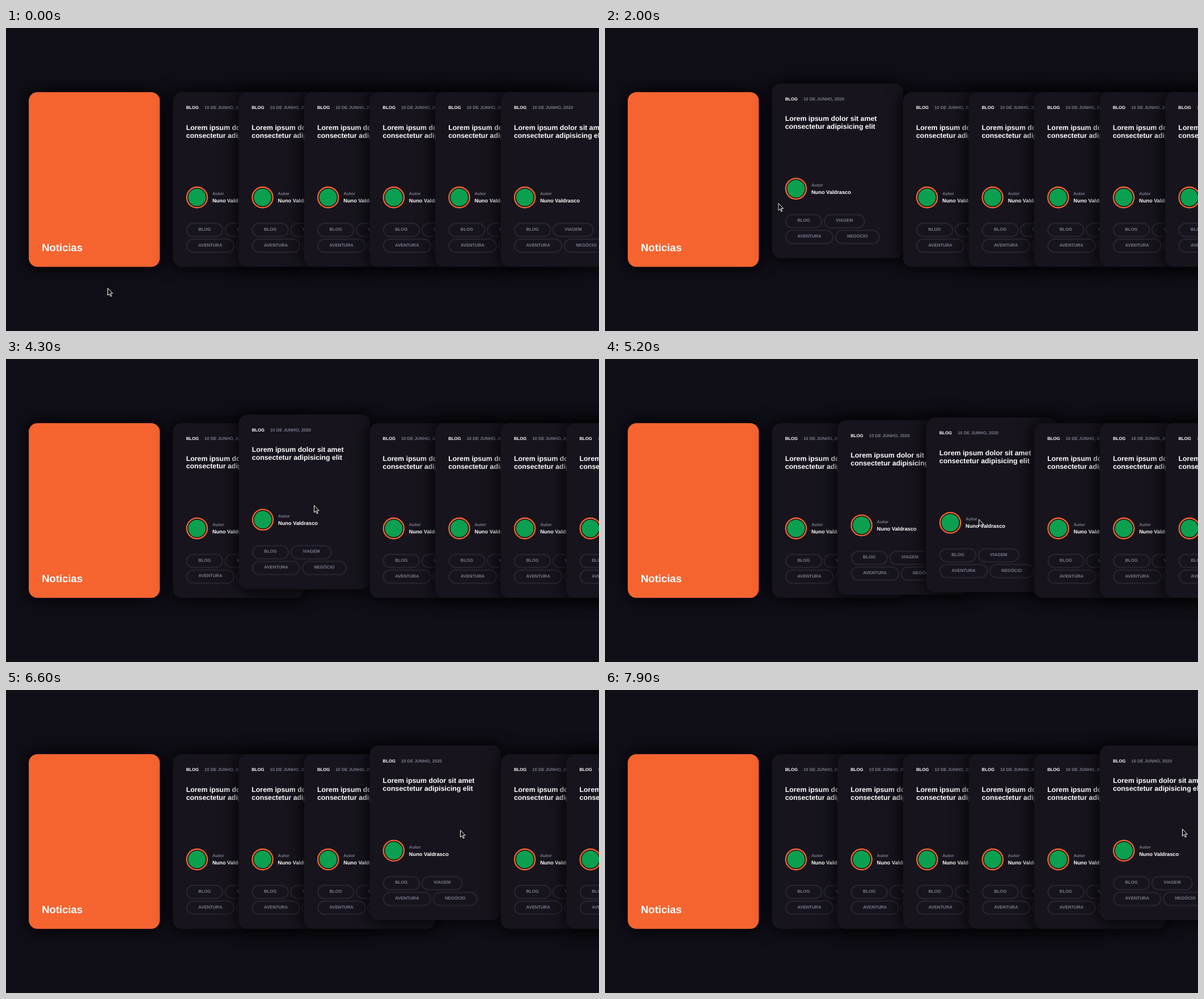
An HTML page that plays this animation: 1046x535 px, repeating every 8 s.

```html
<!DOCTYPE html>
<html lang="pt">
<head>
<meta charset="utf-8">
<style>
  html, body { margin: 0; width: 100%; height: 100%; overflow: hidden; background: #100e17; }
  #stage { position: relative; width: 100%; height: 100%; overflow: clip; contain: strict; }
  #deck {
    position: absolute; width: 100%; height: 100%;
    transform: scale(.771); transform-origin: 0 0;
    font: bold 10px/12px "Liberation Sans", Arial, sans-serif;
    text-rendering: geometricPrecision; white-space: nowrap; color: #7a7a8c;
  }
  .card {
    position: absolute; left: 52px; top: 147px; width: 300px; height: 400px;
    border-radius: 20px; background: #17141d; box-shadow: 0 0 40px #000;
  }
  .card > * { position: absolute; left: 30px; }
  .title { background: #f66430; }
  .title b { top: 342.7px; font-size: 24px; line-height: 27px; color: #fff; }
  .head { top: 30.7px; }
  .head b { margin-right: 13px; color: #fff; }
  .text { top: 72.7px; font-size: 16px; line-height: 18px; color: #fff; }
  .avatar {
    top: 216px; width: 40px; height: 40px; padding: 2px; border: 3px solid #f66430;
    border-radius: 50%; background: #0aa04f content-box;
  }
  .card > .author { left: 90px; top: 227.7px; }
  .author b { display: block; margin-top: 2px; font-size: 12px; line-height: 14px; color: #fff; }
  .tags { top: 299px; }
  .tags div { display: flex; gap: 3px; margin-bottom: 3.5px; }
  .tags span { padding: 7.25px 25px; border: 3px solid #28242f; border-radius: 20px; }
  #cursor { position: absolute; left: 0; top: 0; }
</style>
</head>
<body>
<div id="stage">
  <div id="deck"><div class="card title"><b>Noticias</b></div></div>
  <svg id="cursor" width="12" height="18">
    <path d="M.5 .5V13L3.4 10.4 5.4 15 7.3 14.2 5.3 9.7H9.2Z" fill="#111" stroke="#fff"/>
  </svg>
</div>
<script>
const LOOP = 8000, STEP = 100, COUNT = 6;
const SCALE = .771, FIRST = 382, GAP = 150, LIFT = -20;
const EASE_MS = 200, LAG = 40;

// Pointer stops: time, x, y
const stops = [
  [400, 179, 459], [700, 188, 377], [1000, 197, 425], [1800, 298, 343], [2100, 309, 292],
  [3000, 317, 296], [3100, 467, 313], [3500, 481, 312], [4300, 543, 258], [4900, 590, 293],
  [5100, 645, 285], [5900, 757, 266], [6600, 801, 247], [7000, 900, 250], [7600, 1000, 250],
  [7900, 1018, 245]
];

const stage = document.getElementById('stage');
const deck = document.getElementById('deck');
const cursor = document.getElementById('cursor');
const cards = Array.from({ length: COUNT }, (_, i) => {
  const card = document.createElement('div');
  card.className = 'card';
  card.style.left = FIRST + GAP * i + 'px';
  card.innerHTML = `
    <div class="head"><b>BLOG</b>10 DE JUNHO, 2020</div>
    <div class="text">Lorem ipsum dolor sit amet<br>consectetur adipisicing elit</div>
    <div class="avatar"></div>
    <div class="author">Autor<b>Nuno Valdrasco</b></div>
    <div class="tags">
      <div><span>BLOG</span><span>VIAGEM</span></div>
      <div><span>AVENTURA</span><span>NEGÓCIO</span></div>
    </div>`;
  return deck.appendChild(card);
});

const mix = (a, b, k) => a + (b - a) * k;
const ease = x => 1 - (1 - Math.min(x, 1)) ** 2.3;

// Point on the pointer path where column `key` (0 time, 1 x) reaches `value`
function along(key, value) {
  const i = stops.findIndex(s => s[key] > value);
  if (i < 1) return stops.at(i);
  const a = stops[i - 1], b = stops[i];
  return a.map((v, n) => mix(v, b[n], (value - a[key]) / (b[key] - a[key])));
}

// Cards right of the hovered one stand aside, so each is entered at its shifted edge
const hoverTimes = cards.map((_, i) => {
  const edge = FIRST + GAP * (i && i + 1);
  return along(1, edge * SCALE)[0] + LAG;
});

const offset = (card, hovered) => [
  hovered >= 0 && card > hovered ? GAP : 0,
  card === hovered ? LIFT : 0
];

const move = (el, x, y) => { el.style.transform = `translate(${x}px, ${y}px)`; };

function draw(t) {
  const hovered = hoverTimes.filter(h => h <= t).length - 1;
  const k = hovered < 0 ? 1 : ease((t - hoverTimes[hovered]) / EASE_MS);
  cards.forEach((card, i) => {
    const from = offset(i, hovered - 1), to = offset(i, hovered);
    move(card, mix(from[0], to[0], k), mix(from[1], to[1], k));
  });
  const [, x, y] = along(0, t);
  move(cursor, x, y);
}

function tick() {
  draw(Math.floor(performance.now() % LOOP / STEP) * STEP);
  requestAnimationFrame(tick);
}
tick();
</script>
</body>
</html>
```
